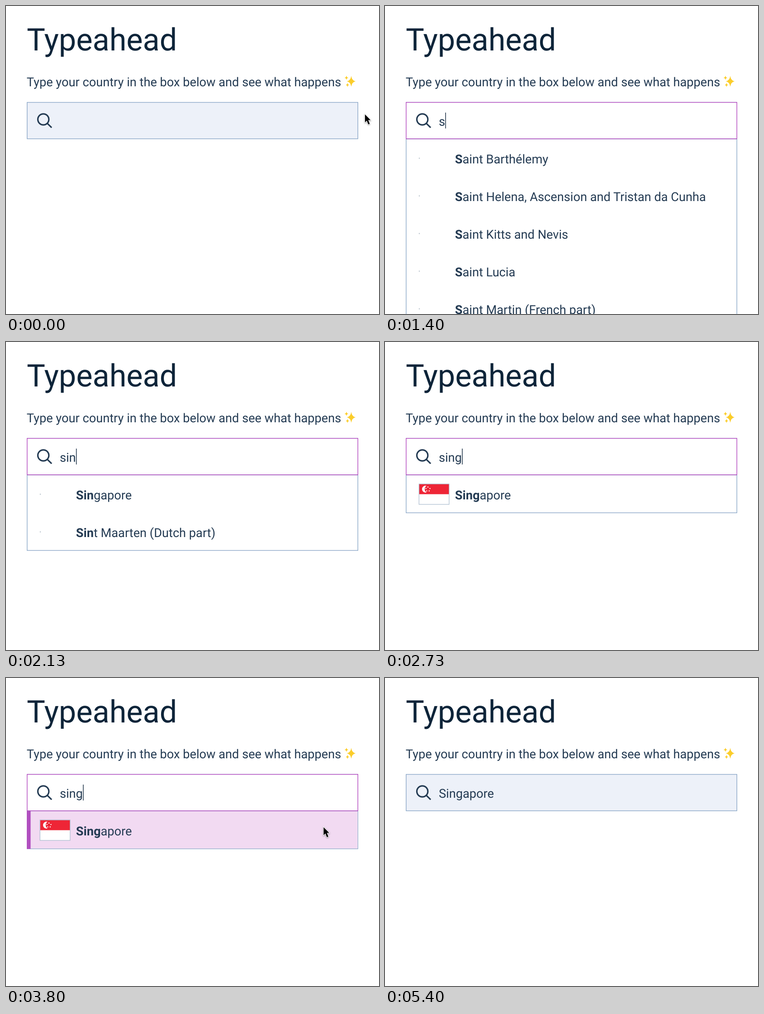
These frames come from a looping animation (825 by 679 pixels, 5.54 s). An HTML page:

```html
<!DOCTYPE html>
<html lang="en">
<head>
<meta charset="utf-8">
<title>Typeahead</title>
<style>
  html, body { margin: 0; width: 100%; height: 100%; overflow: hidden; background: #fff; }
  svg { display: block; }
  text { font: 27.2px Roboto, sans-serif; fill: #243b53; text-rendering: geometricPrecision; white-space: pre; }
  text.title { font-size: 68.4px; fill: #0d2439; }
  .match { font-weight: 700; }
  .frame { fill: none; stroke: #8ba7c7; stroke-width: 1.4; }
</style>
</head>
<body>
<svg width="825" height="679" viewBox="0 0 825 679">
  <defs>
    <path id="star" d="M0 -1Q.14 -.14 1 0Q.14 .14 0 1Q-.14 .14 -1 0Q-.14 -.14 0 -1Z"/>
    <g id="flag">
      <rect x="75.2" y="313" width="66.6" height="45" fill="#fff"/>
      <rect x="75.2" y="313" width="66.6" height="22.5" fill="#ee2536"/>
      <path d="M92 317.1A7.6 7.6 0 1 0 92 331.5A8.3 8.3 0 0 1 92 317.1Z" fill="#fff"/>
      <g id="flagStars" fill="#fff"></g>
      <rect x="75.2" y="313" width="66.6" height="45" fill="none" stroke="#a9bbcd" stroke-width="1.2"/>
    </g>
  </defs>

  <text class="title" x="46" y="98">Typeahead</text>
  <text x="45.8" y="176.6">Type your country in the box below and see what happens</text>
  <g fill="#fbcd2b">
    <use href="#star" transform="translate(763.6 166) scale(9.6 12)"/>
    <use href="#star" transform="translate(753 158.3) scale(4.4 5)"/>
    <use href="#star" transform="translate(755.3 174) scale(4 4.8)"/>
  </g>

  <g id="list">
    <rect id="listFrame" class="frame" x="46.7" y="292.7" width="731.6"/>
    <g id="hover">
      <rect x="46" y="293" width="731.6" height="83" fill="#f2daf2"/>
      <rect x="46" y="293" width="8.4" height="84" fill="#b04fbf"/>
    </g>
    <g id="rows"></g>
  </g>

  <rect class="frame" x="46.7" y="212.5" width="731.6" height="80.2" style="fill:#edf1f9"/>
  <rect id="focusBox" x="46.7" y="212.5" width="731.6" height="80.2" fill="#fff" stroke="#b144bd" stroke-width="1.4"/>
  <g fill="none" stroke="#243b53" stroke-width="3.2">
    <circle cx="82.6" cy="250" r="12.2"/>
    <path d="M91.2 258.6L101 268.2"/>
  </g>
  <text id="input" x="118.9" y="263.9"></text>
  <rect id="caret" y="235" width="1.5" height="35" fill="#1c3146"/>

  <g id="pointer">
    <path id="arrow" d="M0 0V17.5L4 13.8L7.3 22L10.5 20.7L7.2 12.6H12.4Z" stroke="#fff" stroke-width="2"
      paint-order="stroke" style="filter:drop-shadow(0 1.5px 1.5px #0006)"/>
    <g id="beam" fill="none">
      <path id="beamHalo" stroke="#fff" stroke-width="3.4"/>
      <path id="beamLine" stroke="#000" stroke-width="1.6"/>
    </g>
  </g>
</svg>
<script>
const LOOP = 5540, TICK = 1000 / 15, ROW = 83;
const $ = id => document.getElementById(id);
const clamp = v => Math.max(0, Math.min(1, v));
const show = (el, on) => el.style.display = on ? '' : 'none';

// Input value by starting tick
const typing = [[0, ''], [21, 's'], [26, 'si'], [32, 'sin'], [37, 'sing'], [60, 'Singapore']];
const results = {
  s: ['Saint Barthélemy', 'Saint Helena, Ascension and Tristan da Cunha', 'Saint Kitts and Nevis',
    'Saint Lucia', 'Saint Martin (French part)', 'Saint Pierre and Miquelon'],
  si: ['Sierra Leone', 'Singapore', 'Sint Maarten (Dutch part)'],
  sin: ['Singapore', 'Sint Maarten (Dutch part)'],
  sing: ['Singapore']
};
// Pointer path: tick, x, y
const path = [[0, 794, 239], [1, 782, 240], [2, 755, 240], [3, 732, 240], [4, 721.5, 240],
  [51, 721, 250], [52, 716.5, 276], [53, 711, 302], [54, 706, 318], [55, 703.5, 326], [56, 702.5, 329]];
const latest = (keys, tick) => keys.filter(k => k[0] <= tick).pop();
const within = (tick, a, b) => tick >= a && tick < b;

const beam = 'M-5 -10.5Q0 -10.5 0 -7Q0 -10.5 5 -10.5M0 -7V7M-5 10.5Q0 10.5 0 7Q0 10.5 5 10.5M-3 2.5H3';
$('beamHalo').setAttribute('d', beam);
$('beamLine').setAttribute('d', beam);
for (let i = 0; i < 5; i++) {
  const a = (i * 72 - 90) * Math.PI / 180;
  $('flagStars').innerHTML +=
    `<circle cx="${95 + 4.7 * Math.cos(a)}" cy="${324.5 + 4.7 * Math.sin(a)}" r="1.2"/>`;
}

function rowMarkup(name, i, length, flagged) {
  const icon = flagged ? '<use href="#flag"/>'
    : '<rect x="74.8" y="334.5" width="2.2" height="2.2" fill="#b5c0ca"/>';
  return `<g transform="translate(0 ${i * ROW})">${icon}<text x="154.8" y="346.8">` +
    `<tspan class="match">${name.slice(0, length)}</tspan>${name.slice(length)}</text></g>`;
}

let drawn = -1;
function draw(tick) {
  if (tick === drawn) return;
  drawn = tick;

  const value = latest(typing, tick)[1];
  const names = results[value] || [];
  $('input').textContent = value;
  show($('list'), names.length);
  $('listFrame').setAttribute('height', names.length * ROW + 0.8);
  $('rows').innerHTML = names.map((n, i) => rowMarkup(n, i, value.length, tick >= 38)).join('');
  $('hover').style.opacity = clamp((tick - 52) / 3);
  $('focusBox').style.opacity = clamp((tick - 7) / 3) - clamp((tick - 57) / 2);

  show($('caret'), within(tick, 8, 16) || within(tick, 21, 45) || within(tick, 52, 58));
  $('caret').setAttribute('x', 119.2 + (value ? $('input').getComputedTextLength() : 0));

  const [, x, y] = latest(path, tick);
  const isArrow = x > 779 || y > 293;
  show($('arrow'), isArrow);
  show($('beam'), !isArrow);
  show($('pointer'), !within(tick, 21, 51) && tick < 81);
  $('pointer').style.opacity = tick < 80 ? 1 : 0.5;
  $('pointer').setAttribute('transform', `translate(${x} ${y})`);
}

const start = performance.now();
function loop() {
  const time = (performance.now() - start) % LOOP;
  draw(Math.floor((time + 4) / TICK));
  requestAnimationFrame(loop);
}
loop();
</script>
</body>
</html>
```
